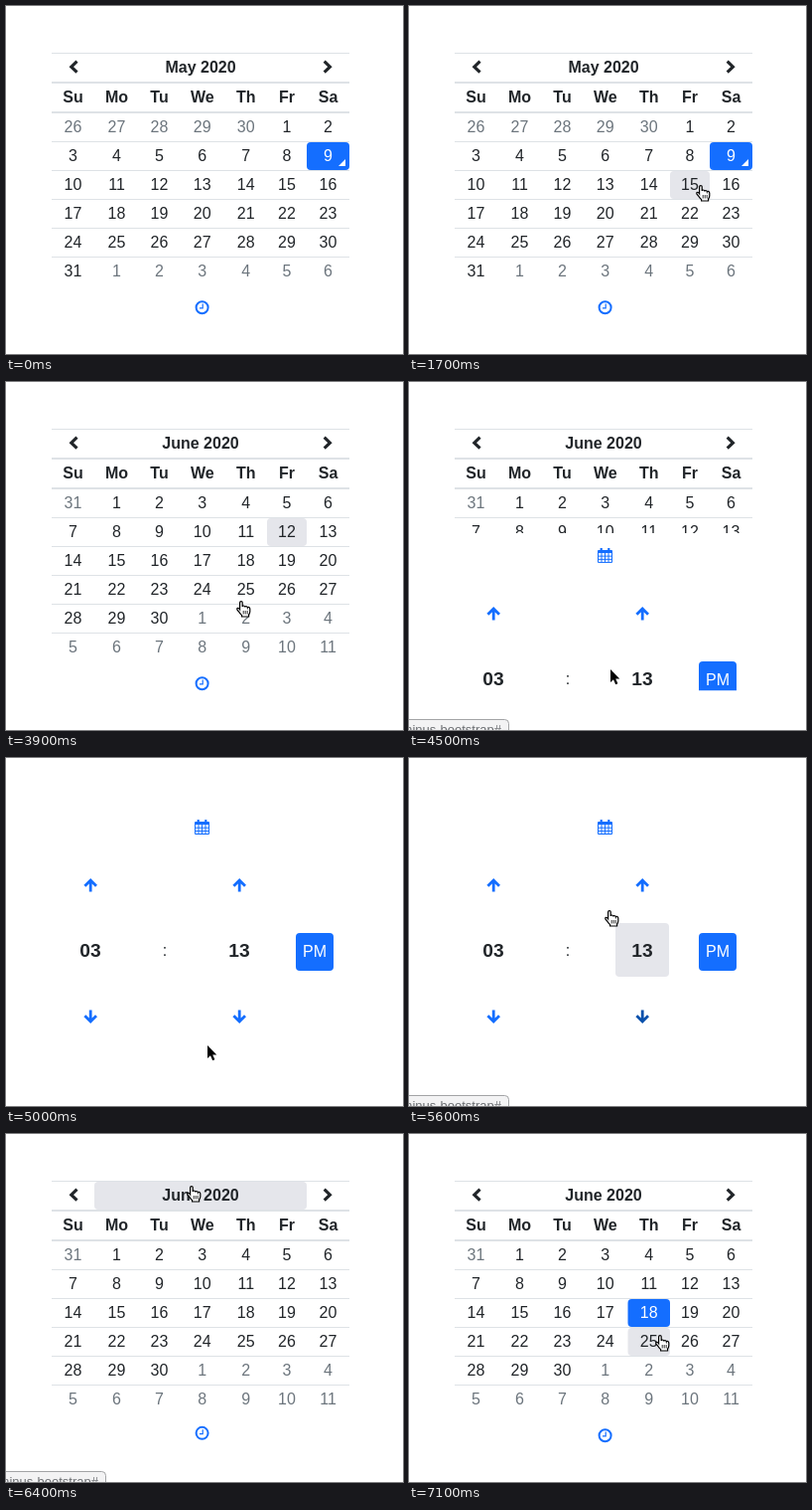
An HTML page that plays this animation: 400x350 px, repeating every 7.4 s.

```html
<!DOCTYPE html>
<html lang="en">
<head>
<meta charset="utf-8">
<title>Date and time picker</title>
<style>
html, body { margin: 0; width: 100%; height: 100%; overflow: hidden; background: #fff; }
svg { display: block; width: 400px; height: 350px; font: 16px "Liberation Sans", Arial, sans-serif; }
text { text-anchor: middle; fill: #212529; white-space: pre; }
.b { font-weight: 700; }
.big { font-size: 19.2px; }
.mute { fill: #6c757d; }
.on { fill: #fff; }
.tip { font-size: 13px; text-anchor: end; fill: #6b6e72; }
</style>
</head>
<body>
<svg id="stage" viewBox="0 0 400 350"></svg>
<script>
const LOOP = 7400, STEP = 100, FADE = 350;
const BLUE = '#146eff', DARK = '#0b51ac', HOVER = '#e5e6eb', LINE = '#dee2e6', INK = '#212529';
const CAL_TOP = 47, CAL_H = 234, TIME_H = 211;
const EDGES = [46, 89, 134, 175, 220.5, 263, 303, 346];
const DAYS = ['Su', 'Mo', 'Tu', 'We', 'Th', 'Fr', 'Sa'];

// Moments of the clicks
const PICK_MAY = 2000, NEXT = 2900, TO_TIME = 4388, TO_DATE = 6096, PICK_JUNE = 6900;

// Pointer path: time, x, y
const PATH = [
  [1200, 342, 219], [1500, 306, 187], [1700, 294, 180], [2100, 294, 180],
  [2200, 298, 164], [2600, 323, 75], [2700, 324, 72], [2900, 324, 72],
  [3600, 304, 87], [3700, 304, 87], [4000, 204, 287], [4100, 203, 289],
  [5000, 203, 289], [5300, 228, 268], [5400, 232, 248], [5500, 222, 190],
  [5600, 202, 153], [5700, 188, 54], [5800, 187, 52], [6500, 187, 52],
  [6800, 240, 180], [6900, 241, 181], [7000, 250, 197], [7100, 253, 202]
];

function pointer(t) {
  if (t < PATH[0][0]) return null;
  const i = PATH.findIndex(p => p[0] > t);
  if (i < 0) return PATH[PATH.length - 1].slice(1);
  const [t0, x0, y0] = PATH[i - 1], [t1, x1, y1] = PATH[i];
  const k = (t - t0) / (t1 - t0);
  return [x0 + (x1 - x0) * k, y0 + (y1 - y0) * k];
}

// CSS "ease"
function ease(x) {
  if (x <= 0) return 0;
  if (x >= 1) return 1;
  const bez = (a, b, s) => 3 * a * s * (1 - s) ** 2 + 3 * b * s * s * (1 - s) + s ** 3;
  let lo = 0, hi = 1;
  for (let i = 0; i < 24; i++) {
    const mid = (lo + hi) / 2;
    if (bez(.25, .25, mid) < x) lo = mid; else hi = mid;
  }
  return bez(.1, 1, lo);
}

// 0 = calendar open, 1 = time open
const openness = t => ease((t - TO_TIME) / FADE) - ease((t - TO_DATE) / FADE);

// What the pointer rests on; hover lags the pointer by one step
function hit(t) {
  const p = pointer(t - STEP);
  if (!p) return '';
  const [x, y] = p, open = openness(t), h = CAL_H * (1 - open);
  const col = EDGES.findIndex((e, i) => x >= e && x < EDGES[i + 1]);
  if (y < CAL_TOP + h) {
    if (col < 0 || y < CAL_TOP) return '';
    if (y < 77) return col === 0 ? 'prev' : col === 6 ? 'next' : 'title';
    return y < 107 ? '' : 'd' + (Math.floor((y - 107) / 29) * 7 + col);
  }
  const ty = y - 49 - h;
  if (ty >= 0 && ty < 40 && x >= 48 && x < 348) return 'toggle';
  const py = ty - 40;
  if (py < 0 || py > TIME_H * open) return '';
  const side = x >= 58 && x < 112 ? 'h' : x >= 208 && x < 262 ? 'm' : '';
  const row = [12, 77, 144].findIndex(v => py >= v && py < v + 54);
  return side && row >= 0 ? side + row : '';
}

const rect = (x, y, w, h, fill, r = 0) =>
  `<rect x="${x}" y="${y}" width="${w}" height="${h}" rx="${r}" fill="${fill}"/>`;
const text = (x, y, s, cls = '') => `<text x="${x}" y="${y}" class="${cls}">${s}</text>`;
const stroke = (d, color, w) =>
  `<path d="${d}" fill="none" stroke="${color}" stroke-width="${w}"/>`;
const mid = c => (EDGES[c] + EDGES[c + 1]) / 2;

function calendar(t, over) {
  const june = t >= NEXT, month = june ? 5 : 4;
  const picked = june ? (t >= PICK_JUNE ? 18 : 0) : t >= PICK_MAY ? 15 : 9;
  let s = '';
  const head = { prev: [46, 43], title: [89, 214], next: [303, 43] }[over];
  if (head) s += rect(head[0], 48, head[1], 28, HOVER, 4);
  s += rect(46, 47, 300, 1, LINE) + rect(46, 76, 300, 2, LINE) + rect(46, 106, 300, 2, LINE);
  for (let r = 1; r < 6; r++) s += rect(46, 107 + 29 * r, 300, 1, LINE);
  s += stroke('M71.5 55.7L65.8 61.2L71.5 66.7', INK, 3.1);
  s += stroke('M320.7 55.7L326.4 61.2L320.7 66.7', INK, 3.1);
  s += text(196, 67, june ? 'June 2020' : 'May 2020', 'b');
  DAYS.forEach((d, c) => s += text(mid(c), 97, d, 'b'));
  for (let i = 0; i < 42; i++) {
    const date = june ? new Date(2020, 4, 31 + i) : new Date(2020, 3, 26 + i);
    const inside = date.getMonth() === month, n = date.getDate();
    const c = i % 7, y = 108 + 29 * Math.floor(i / 7);
    const on = inside && n === picked;
    if (on || over === 'd' + i) {
      s += rect(EDGES[c], y, EDGES[c + 1] - EDGES[c], 28, on ? BLUE : HOVER, 4);
    }
    if (!june && inside && n === 9) {
      s += `<path d="M342 ${y + 17}v7h-7z" fill="${on ? '#fff' : BLUE}"/>`;
    }
    s += text(mid(c), y + 19, n, on ? 'on' : inside ? '' : 'mute');
  }
  return s;
}

function toggle(t, over) {
  const hot = over === 'toggle', color = hot ? DARK : BLUE;
  let s = hot ? rect(48, 0, 300, 40, HOVER, 4) : '';
  if (t >= TO_TIME && t < TO_DATE) {
    s += rect(190, 15, 15, 3, color, 1);
    s += stroke('M190.5 16V27.5H204.5V16M190 21.2H205M190 24.4H205M194 18V27M197.5 18V27M201 18V27', color, 1);
    s += stroke('M193.7 13V17M201.3 13V17', color, 2.2);
  } else {
    s += `<circle cx="197.6" cy="20.2" r="6" fill="none" stroke="${color}" stroke-width="2"/>`;
    s += stroke('M198.2 16.6V20.9H195', color, 1.2);
  }
  return s;
}

function arrow(x, y, dir, color) {
  return `<g transform="translate(${x} ${y}) scale(1 ${dir})">` +
    stroke('M-5.8 .8L0 -5L5.8 .8M0 -4.5V6.6', color, 2.8) + '</g>';
}

function timePanel(over, before) {
  let s = '';
  [['h', 85, '03'], ['m', 235, '13']].forEach(([id, x, n]) => {
    [12, 77, 144].forEach((y, r) => {
      if (over === id + r) s += rect(x - 27, y, 54, 54, HOVER, 4);
    });
    const color = r => over === id + r || before === id + r ? DARK : BLUE;
    s += arrow(x + .2, 39, 1, color(0)) + text(x, 111, n, 'b big') + arrow(x + .2, 171, -1, color(2));
  });
  return s + text(160, 110, ':') + rect(292, 87, 38, 38, BLUE, 4) + text(311, 111, 'PM', 'on');
}

function status() {
  return '<rect x="-6" y="339.5" width="106.5" height="20" rx="4" fill="#f3f3f4" stroke="#a3a4a6"/>' +
    text(93, 354, 'dominus-bootstrap#', 'tip');
}

const HAND = 'M3.6 8.8V2Q3.6 .6 4.9 .6T6.2 2V6Q6.4 5 7.5 5T8.8 6.3Q9 5.5 10 5.5T11.3 6.9' +
  'Q11.5 6.3 12.4 6.4T13.8 8V11Q13.6 13 12.6 14V16H5.6V14.6Q3.8 13 2.6 11L.9 8.9Q.5 7.5 1.6 7.4T3.6 8.8Z';
const ARROW = 'M0 0V13L3 10.3L5.2 15.3L7.4 14.3L5.2 9.6H9.3Z';

function cursor(t, over) {
  const p = pointer(t);
  if (!p) return '';
  const [x, y] = p.map(Math.round);
  return over
    ? `<g transform="translate(${x - 5} ${y})"><path d="${HAND}" fill="#fff" stroke="#000" stroke-width="1.2"/>` +
      stroke('M7.2 10V13.5M9.2 10V13.5M11.2 10V13.5', '#000', .8) + '</g>'
    : `<path transform="translate(${x} ${y})" d="${ARROW}" stroke="#fff" stroke-width="1.6" paint-order="stroke"/>`;
}

function scene(t) {
  const open = openness(t), h = CAL_H * (1 - open), over = hit(t);
  let s = `<clipPath id="cal"><rect x="0" y="47" width="400" height="${h}"/></clipPath>` +
    `<clipPath id="time"><rect x="0" y="0" width="400" height="${TIME_H * open}"/></clipPath>`;
  if (h > 0) s += `<g clip-path="url(#cal)">${calendar(t, over)}</g>`;
  s += `<g transform="translate(0 ${49 + h})">${toggle(t, over)}</g>`;
  if (open > 0) {
    s += `<g transform="translate(0 ${89 + h})"><g clip-path="url(#time)">` +
      timePanel(over, hit(t - STEP)) + '</g></g>';
  }
  if ((t >= 4300 && t < 4900) || (t >= 5500 && t < 6500)) s += status();
  return s + cursor(t, over);
}

const stage = document.getElementById('stage'), start = performance.now();
let shown = -1;
function tick() {
  const t = Math.floor((performance.now() - start) % LOOP / STEP) * STEP;
  if (t !== shown) stage.innerHTML = scene(shown = t);
  requestAnimationFrame(tick);
}
tick();
</script>
</body>
</html>
```
